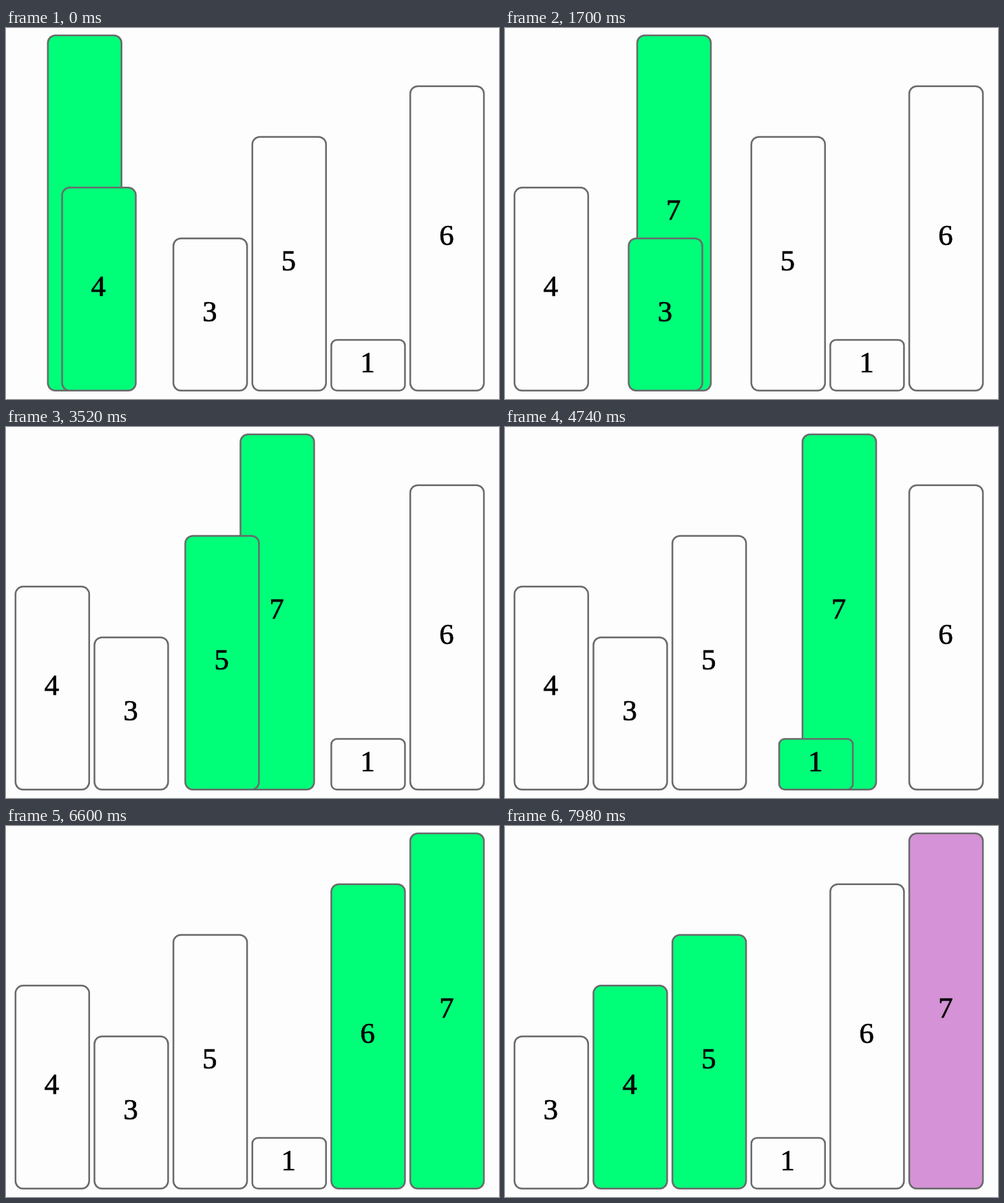
Recreate the animation shown at these times as an HTML page. Size 716x540 px, loop 8 s.

```html
<!DOCTYPE html>
<html lang="en">
<head>
<meta charset="utf-8">
<title>Bubble sort</title>
<style>
  html, body { margin: 0; width: 100%; height: 100%; overflow: hidden; background: #fdfdfd; }
  svg { display: block; width: 716px; height: 540px; }
  rect { stroke: #6a6a6c; stroke-width: 2.5; fill: #fdfdfd; }
  .active rect { fill: #00ff78; }
  .sorted rect { fill: #d592d6; }
  text {
    font: 42.5px "Liberation Serif", "Times New Roman", serif;
    text-anchor: middle;
    stroke: #000;
    stroke-width: .7;
  }
</style>
</head>
<body>
<svg id="stage" viewBox="0 0 716 540"></svg>
<script>
const LOOP = 8000, SWAP = 1150;
const LEFT = 13.8, STEP = 114.66, WIDTH = 107, FLOOR = 527.8, UNIT = 73.86;
const values = [7, 4, 3, 5, 1, 6];

// Each comparison lights slots i and i + 1, from its start to the next one.
const comparisons = [
  { start: -471, slot: 0 },
  { start: 1063, slot: 1 },
  { start: 2543, slot: 2 },
  { start: 3995, slot: 3 },
  { start: 5164, slot: 4 },
  { start: 6700, slot: 0 },
  { start: 7960, slot: 1 }
];
const SECOND_PASS = comparisons[5].start;

const stage = document.getElementById('stage');

function add(parent, tag, attributes = {}) {
  const node = document.createElementNS('http://www.w3.org/2000/svg', tag);
  for (const name in attributes) node.setAttribute(name, attributes[name]);
  return parent.appendChild(node);
}

const bars = values.map(value => {
  const node = add(stage, 'g');
  const height = value * UNIT;
  add(node, 'rect', {
    x: 0, y: FLOOR - height, width: WIDTH, height, rx: Math.min(11, height * .11)
  });
  add(node, 'text', { x: WIDTH / 2 - .8, y: FLOOR - height / 2 + 10.2 }).textContent = value;
  return { value, node };
});

// The picture advances in an uneven beat: 20, 100 and 20 ms.
function onBeat(time) {
  const rest = time % 140;
  return time - rest + (rest < 20 ? 0 : rest < 120 ? 20 : 120);
}

function draw(time) {
  const order = [...bars];
  let active = [];
  bars.forEach((bar, i) => bar.slot = i);

  for (const { start, slot } of comparisons) {
    if (time < start) break;
    const [a, b] = active = [order[slot], order[slot + 1]];
    if (a.value < b.value) continue;
    const progress = Math.min(1, (time - start) / SWAP);
    a.slot = slot + progress;
    b.slot = slot + 1 - progress;
    order[slot] = b;
    order[slot + 1] = a;
  }

  for (const bar of bars) {
    const sorted = bar.value === 7 && time >= SECOND_PASS;
    bar.node.setAttribute('class', sorted ? 'sorted' : active.includes(bar) ? 'active' : '');
    bar.node.setAttribute('transform', `translate(${LEFT + bar.slot * STEP} 0)`);
  }
}

const begin = performance.now();
function tick() {
  draw(onBeat((performance.now() - begin) % LOOP));
  requestAnimationFrame(tick);
}
tick();
</script>
</body>
</html>
```
